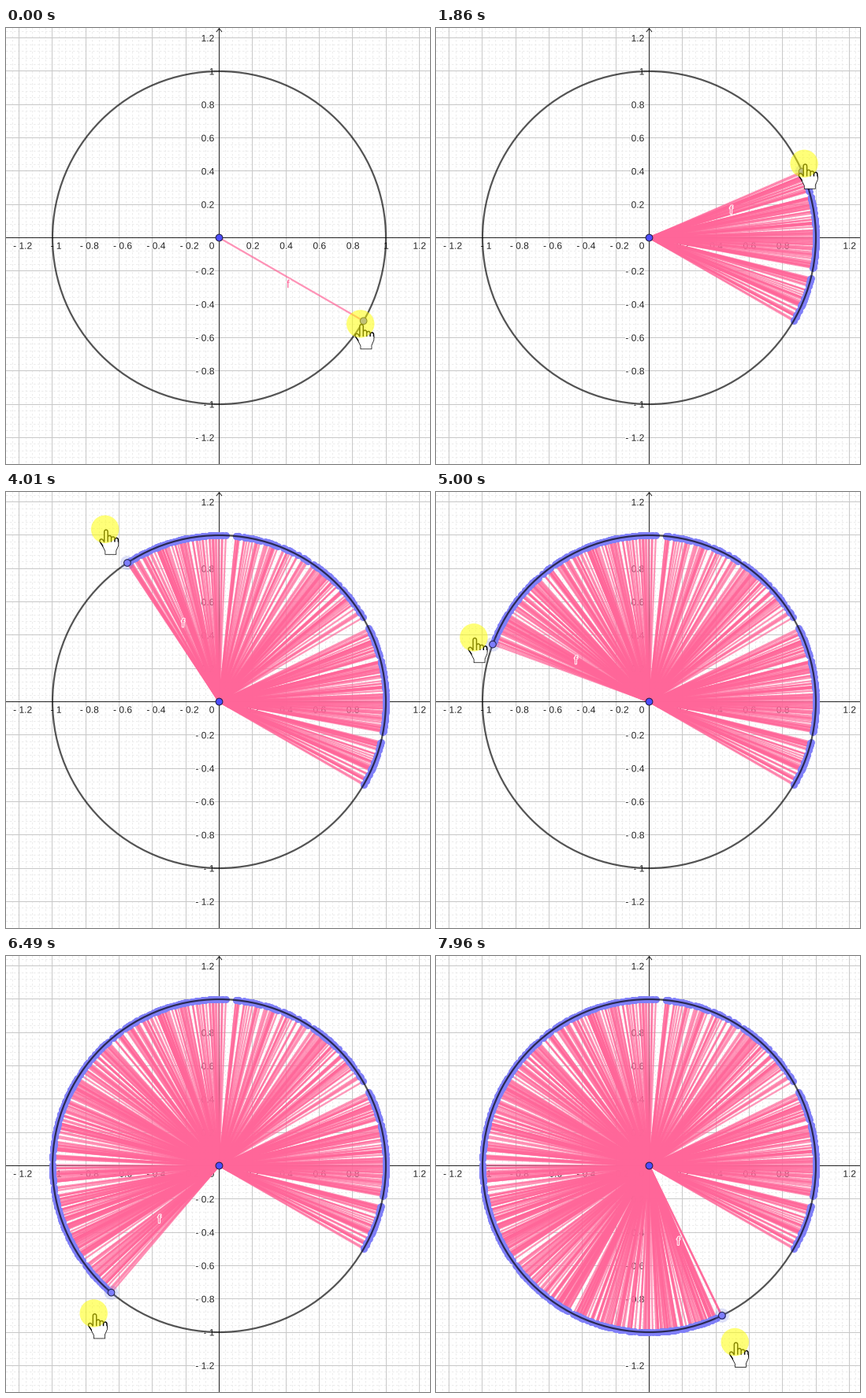
Recreate the animation shown at these times as a matplotlib script. Size 538x554 px, loop 8 s.

```python
import numpy as np
import matplotlib.pyplot as plt
from matplotlib.animation import FuncAnimation
from matplotlib.collections import LineCollection
from matplotlib.patches import Circle, Polygon
from matplotlib.patheffects import withStroke
from matplotlib.transforms import Affine2D

W, H, DPI = 538, 554, 100
PX = 72 / DPI
OX, OY, R = 270.5, 266.5, 211.5
STEP, LOOP, START = 40, 8000, 130
PINK, BLUE = "#ff6699", "#7d7dff"

plt.rcParams["font.family"] = "Liberation Sans"
plt.rcParams["path.snap"] = False
fig = plt.figure(figsize=(W / DPI, H / DPI), dpi=DPI, facecolor="white")
ax = fig.add_axes([0, 0, 1, 1])
ax.set_xlim(0, W)
ax.set_ylim(H, 0)
ax.axis("off")


def on_circle(angle, radius=R):
    a = np.radians(angle)
    return OX + radius * np.cos(a), OY - radius * np.sin(a)


def add_lines(segs, color, z, **style):
    lines = LineCollection(segs, colors=color, linewidths=PX, zorder=z, **style)
    lines.set_snap(False)
    ax.add_collection(lines)


def grid(unit, color, z, **style):
    k = np.arange(-40, 41)
    xs = np.floor(OX + k * unit) + 0.5
    ys = np.floor(OY + k * unit) + 0.5
    segs = [[(x, 0), (x, H)] for x in xs if 0 < x < W]
    segs += [[(0, y), (W, y)] for y in ys if 0 < y < H]
    add_lines(segs, color, z, **style)


def label(x, y, text, ha):
    ax.text(x, y + 4.4, text, size=12 * PX, ha=ha, va="baseline",
            color="#222222", zorder=3,
            path_effects=[withStroke(linewidth=2.5 * PX, foreground="white")])


def draw_axes():
    grid(R * 0.04, "#ececec", 0, linestyles=(0, (2.5, 2.5)))
    grid(R * 0.2, "#c8c8c8", 1)
    arrow = [(OX - 3.5, 5), (OX, 0.5), (OX + 3.5, 5)]
    add_lines([[(0, OY), (W, OY)], [(OX, 0), (OX, H)], arrow], "#222222", 2)
    label(264.5, 276.3, "0", "right")
    for k in range(-6, 7):
        if k:
            text = ("- " if k < 0 else "") + f"{abs(k) / 5:g}"
            shift = 4.5 if k < 0 else 0.5
            label(OX + k * R / 5 + shift, 276.3, text, "center")
            label(264.5, OY - k * R / 5, text, "right")


def ray_angles():
    """Irregular spacing, with three places where the drag skipped ahead."""
    rng = np.random.default_rng(12)
    skips = [(-14.0, -10.5), (26.1, 30.4), (84.2, 87.7)]
    angles, a = [e for s in skips for e in s], -30.0
    while a < 297:
        if not any(lo < a < hi for lo, hi in skips):
            angles.append(a)
        mean = 0.6 if 30 < a < 85 else 0.42
        a += min(rng.exponential(mean), 2)
    return np.sort(angles)


def draw_hand(place, unit):
    """Pointing hand: a black layer, then a narrower white one on top."""
    strokes = [((x, x), (top, 12)) for x, top in zip((6, 9, 12, 15), (2, 7, 8, 9))]
    strokes.append(((2, 5), (10, 14.5)))
    palm = [(4.5, 11), (16.5, 11), (16.5, 14), (14.5, 18.5), (14.5, 21.5),
            (5.5, 21.5), (5.5, 19), (3.5, 15)]
    for color, width, edge, z in (("black", 4, 1, 10), ("white", 2, 0, 11)):
        ax.add_patch(Polygon(palm, fc=color, ec="black", lw=edge * unit * PX,
                             transform=place, zorder=z))
        for xs, ys in strokes:
            ax.plot(xs, ys, color=color, lw=width * unit * PX,
                    solid_capstyle="round", transform=place, zorder=z)


draw_axes()
angles = ray_angles()
ends = np.column_stack(on_circle(angles))
segments = np.stack([np.full_like(ends, (OX, OY)), ends], axis=1)

rays = LineCollection([], colors=PINK, linewidths=2.3 * PX, alpha=0.68, zorder=4)
ax.add_collection(rays)
dots, = ax.plot([], [], "o", ms=9 * PX, color="#7f7ff8", mew=0, zorder=5)
line, = ax.plot([], [], color=PINK, alpha=0.7, lw=2.2 * PX, zorder=6)
ax.add_patch(Circle((OX, OY), R, fill=False, ec="black", alpha=0.67,
                    lw=2.2 * PX, zorder=7))
halo = ax.add_patch(Circle((0, 0), 9, fc="#5566dd", alpha=0.2, lw=0, zorder=8))
knob = ax.add_patch(Circle((0, 0), 4.3, fc=BLUE, ec="#22224a", lw=PX, zorder=9))
ax.add_patch(Circle((OX, OY), 4.4, fc="#4d4dff", ec="#1a1a40", lw=PX, zorder=9))
name = ax.text(0, 0, "f", size=14.5 * PX, ha="center", va="baseline",
               color=PINK, zorder=9,
               path_effects=[withStroke(linewidth=2 * PX, foreground="white")])

UNIT = 1.47
move = Affine2D()
draw_hand(move + ax.transData, UNIT)
glow = ax.add_patch(Circle((0, 0), 17.7, fc="#ffff00", alpha=0.53, lw=0, zorder=12))

# drag speed changes at a few moments; the pointer stays outside the circle
key_t = [START, 1860, 3080, 4010, 5000, 6490, 7960]
key_angle = [-30, 23.4, 88.2, 123.1, 158.9, 229.2, 295.9]
key_radius = [210, 218, 255, 263, 237, 246, 249]


def update(i):
    t = i * STEP + STEP / 2
    a = np.interp(t, key_t, key_angle)
    lead = np.interp(t, key_t[:3], [-1.4, 2.2, 0])
    px, py = on_circle(a)
    cx, cy = on_circle(a + lead, np.interp(t, key_t, key_radius))

    move.clear().scale(UNIT).translate(cx - 7.5, cy)
    glow.center = cx, cy
    dragging = t > START
    n = np.searchsorted(angles, a) if dragging else 0
    rays.set_segments(segments[:n])
    dots.set_data(ends[:n, 0], ends[:n, 1])
    line.set_data([OX, px], [OY, py])
    halo.center = knob.center = px, py
    halo.set_visible(dragging)

    # the letter sits beside the middle of the radius
    s, c = np.sin(np.radians(a)), np.cos(np.radians(a))
    name.set_position(((OX + px) / 2 + 2 + 12.5 * s,
                       (OY + py) / 2 + 12.5 * c))
    return []


anim = FuncAnimation(fig, update, frames=LOOP // STEP, interval=STEP,
                     repeat=True, repeat_delay=0, blit=False)
plt.show()
```
